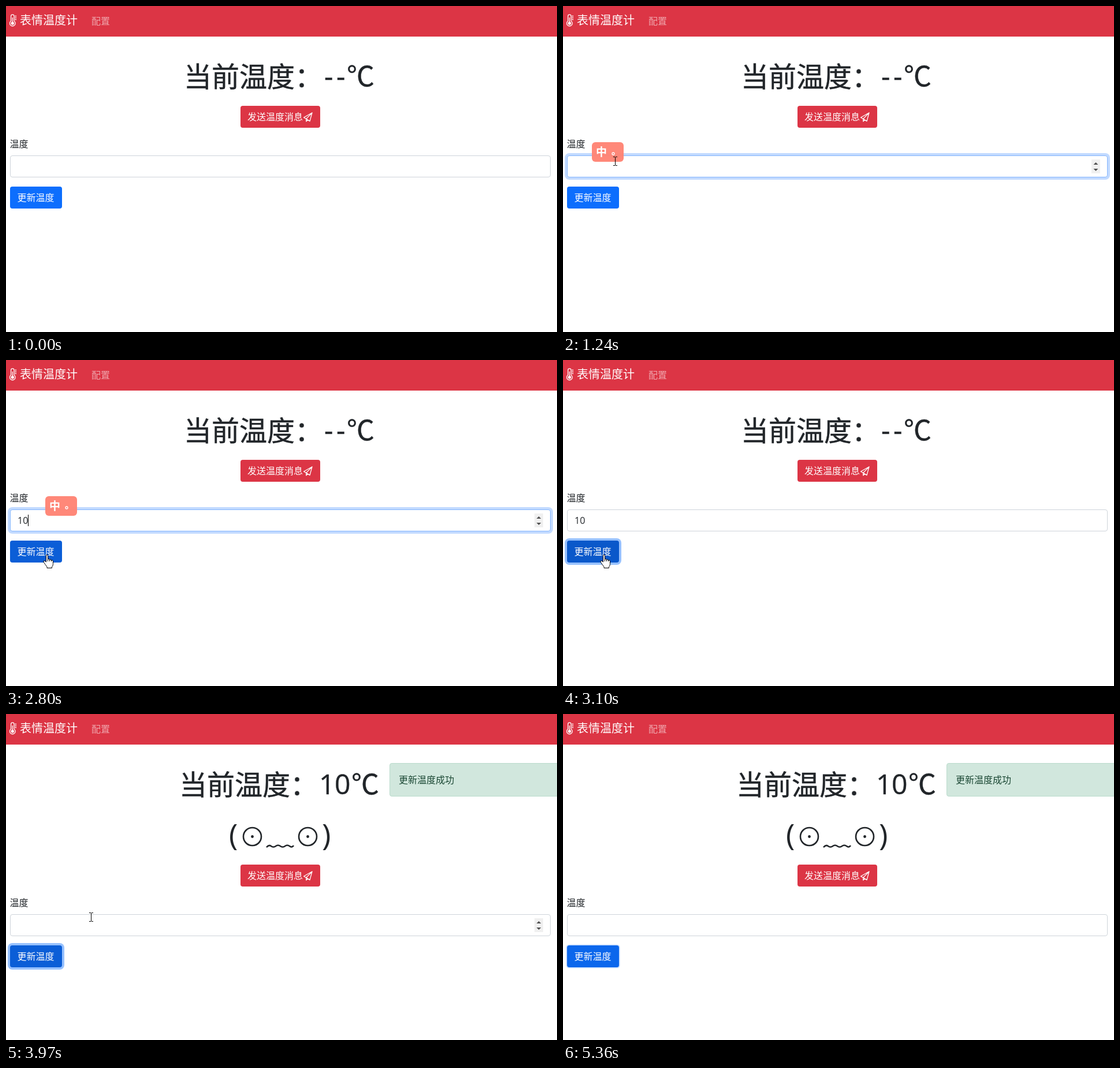
Animation of 954x565 px, one loop 5.44 s. Source, as an HTML page:

```html
<!DOCTYPE html>
<html lang="zh-CN">
<head>
<meta charset="utf-8">
<style>
html, body { margin: 0; width: 100%; height: 100%; overflow: hidden; background: #fff; }
svg { display: block; font: 16px "Noto Sans CJK SC", "Noto Sans CJK", "Noto Sans", sans-serif; fill: #212529; }
.latin { font-family: "Open Sans", "Noto Sans", sans-serif; }
.big { font-size: 48px; stroke: #212529; stroke-width: .4; }
.white { fill: #fff; }
.line { fill: none; stroke: #fff; stroke-width: 1.3; stroke-linejoin: round; }
.ink { fill: none; stroke: #212529; stroke-width: 2.6; }
.pointer { fill: #fff; stroke: #000; stroke-linejoin: round; }
</style>
</head>
<body>
<svg width="954" height="565" viewBox="0 0 954 565">
  <rect width="954" height="53" fill="#dc3545"/>
  <g class="line">
    <path d="M8.6 26V17.5a2.7 2.7 0 0 1 5.4 0V26a4.8 4.8 0 1 1-5.4 0z"/>
    <path d="M11.3 20v10M15.5 17.5h2.5M15.5 20.5h2.5M15.5 23.5h2.5"/>
    <circle cx="11.3" cy="30" r="2" class="white"/>
  </g>
  <text x="24" y="32" font-size="20" class="white">表情温度计</text>
  <text x="148" y="32" class="white" opacity=".55">配置</text>

  <g class="big">
    <text id="title" y="140">当前温度：</text>
    <text id="value" y="139" class="latin"></text>
    <text id="unit" y="139">℃</text>
  </g>

  <g id="result">
    <g class="latin" font-size="52">
      <text x="386" y="228">(</text>
      <text x="547" y="228">)</text>
    </g>
    <g class="ink">
      <circle cx="426.5" cy="212.5" r="15.5"/>
      <circle cx="522.5" cy="212.5" r="15.5"/>
      <path d="M451 231Q455 226 459 229T467 229T475 229T483 229T491 229T498 228"/>
    </g>
    <circle cx="426.5" cy="212.5" r="2.4"/>
    <circle cx="522.5" cy="212.5" r="2.4"/>
    <rect x="664.5" y="85.5" width="310" height="57" rx="3.5" fill="#d1e7dd" stroke="#badbcc"/>
    <text x="680" y="120" fill="#1a4733">更新温度成功</text>
  </g>

  <g id="form">
    <rect x="406" y="173" width="138" height="38" rx="4" fill="#dc3545"/>
    <text x="418" y="198" class="white">发送温度消息</text>
    <path class="line" d="M530 185L515.5 193.3L519.8 195.6L526 199.6zL519.8 195.6V200L522.5 197.4"/>
    <text x="6.5" y="245">温度</text>
    <rect id="inputRing" fill="#0d6efd"/>
    <rect id="input" x="7.5" y="259.5" width="935" height="37" rx="3.5" fill="#fff"/>
    <text id="typed" x="20" y="284" class="latin"></text>
    <rect id="caret" y="268" width="1" height="20" fill="#000"/>
    <g id="spinner">
      <rect x="915" y="266" width="15" height="24" fill="#f0f0f0"/>
      <path d="M918.5 275h8l-4-4zM918.5 282h8l-4 4z" fill="#505050"/>
    </g>
    <rect id="buttonRing" fill="#3184fd"/>
    <rect id="button" x="7" y="313" width="90" height="38" rx="4"/>
    <text x="19.5" y="338" class="white">更新温度</text>
  </g>

  <g id="english">
    <rect width="55" height="34" rx="6" fill="#70c8ff" opacity=".96"/>
    <text x="7" y="23.5" class="latin white" font-weight="700">En</text>
    <path class="line" d="M38 11.5A5.5 5.5 0 1 0 45.5 19.5A6 6 0 0 1 38 11.5z"/>
  </g>
  <g id="chinese">
    <rect width="55" height="34" rx="6" fill="#ff8474" opacity=".96"/>
    <text x="7" y="24" class="white" font-size="19" font-weight="700">中</text>
    <circle class="line" cx="37" cy="20" r="2"/>
  </g>

  <g id="cursor">
    <path id="arrow" class="pointer" d="M.5 .5V16.5l4-3.8 2.8 6 2.4-1-2.7-6h5z"/>
    <g id="hand" class="pointer">
      <path d="M-.5 13V2q0-1.5 1.5-1.5t1.5 1.5v6q2.5-1 3 1q2.5-1 3 1q2.5-.5 3 1.5v5q0 3-2 5v2h-8.5v-2q-3-4-6-8.5q-.5-2 1.5-2q1.5 .5 3 2z"/>
      <path fill="none" d="M2.5 8v4M5.5 9v3M8.5 10v2"/>
    </g>
    <path id="beam" fill="none" stroke="#000" d="M-3-7.5H0M1-7.5H4M.5-7V7M-3 7.5H0M1 7.5H4"/>
  </g>
</svg>
<script>
const LOOP = 5440, FOCUS = 690, CLICK = 2950, DONE = 3280, LEAVE = 3970, GONE = 4660, BLUR = 5282;
const $ = id => document.getElementById(id);
const show = (id, on) => $(id).style.display = on ? '' : 'none';
const set = (id, attrs) => { for (const k in attrs) $(id).setAttribute(k, attrs[k]); };
const move = (id, x, y) => set(id, { transform: `translate(${x} ${y})` });

// time, x, y of the pointer; each position holds until the next
const stops = [
  [70, 130, 544], [150, 112, 470], [230, 98, 410], [300, 90, 365], [380, 86, 330],
  [460, 88, 296], [530, 90, 276], [610, 90, 271], [690, 90, 269],
  [2330, 90, 275], [2410, 90, 284], [2490, 88, 302], [2570, 84, 315], [2650, 78, 323],
  [2730, 73, 330], [2800, 70, 337]
];

function pointer(t) {
  if (t < stops[0][0] || t >= GONE) return [-99, -99];
  if (t < LEAVE) return stops.findLast(s => s[0] <= t).slice(1);
  const run = Math.floor((t - LEAVE) / 76) * 76;
  return [Math.round(147 + run * 1.075), Math.round(352 + run * .338)];
}

// eased 150 ms transition
function ramp(t, start) {
  const p = Math.min(1, Math.max(0, (t - start) / 150));
  return p * p * (3 - 2 * p);
}

const mix = (a, b, p) => `rgb(${a.map((v, i) => Math.round(v + (b[i] - v) * p))})`;

function ring(id, x, y, w, h, p, alpha) {
  const s = 4 * p;
  set(id, { x: x - s, y: y - s, width: w + 2 * s, height: h + 2 * s, rx: 4 + s, opacity: alpha * p });
}

function draw(t) {
  const done = t >= DONE, dy = done ? 88 : 0;
  const [x, y] = pointer(t);
  const within = (right, top) => x >= 7 && x < right && y >= top + dy && y < top + 38 + dy;
  const overInput = within(943, 259), overButton = within(97, 313);
  const focused = t >= FOCUS && t < CLICK;

  $('value').textContent = done ? '10' : '--';
  set('title', { x: done ? 300 : 308 });
  set('value', { x: done ? '542 569' : '551 572' });
  set('unit', { x: done ? 598 : 590 });
  show('result', done);
  move('form', 0, dy);

  const inputFocus = ramp(t, FOCUS - 10) - ramp(t, CLICK - 10);
  ring('inputRing', 7, 259, 936, 38, inputFocus, .25);
  set('input', { stroke: mix([206, 212, 218], [134, 183, 254], inputFocus) });
  ring('buttonRing', 7, 313, 90, 38, ramp(t, CLICK - 10) - ramp(t, BLUR), .5);
  const hover = ramp(t, 380) - ramp(t, 460) + ramp(t, 2570) - ramp(t, BLUR);
  const press = ramp(t, CLICK - 10) - ramp(t, 3180);
  set('button', { fill: mix([13, 110, 253], [10, 88, 202], .74 * hover + .26 * press) });

  const count = done || t < 1460 ? 0 : t < 1690 ? 1 : 2;
  $('typed').textContent = '10'.slice(0, count);
  set('caret', { x: 20 + 9 * count });
  show('caret', focused && !(t >= 1240 && t < 1460) && !(t >= 2230 && t < 2800));
  show('spinner', overInput || focused);

  show('english', overInput && t < FOCUS);
  move('english', x + 29, y - 31);
  show('chinese', focused);
  move('chinese', t < 1540 ? 50 : 50 + 9 * count, 236);

  move('cursor', x, y);
  show('beam', overInput);
  show('hand', overButton);
  show('arrow', !overInput && !overButton);
}

function frame() {
  draw(performance.now() % LOOP);
  requestAnimationFrame(frame);
}
frame();
</script>
</body>
</html>
```
